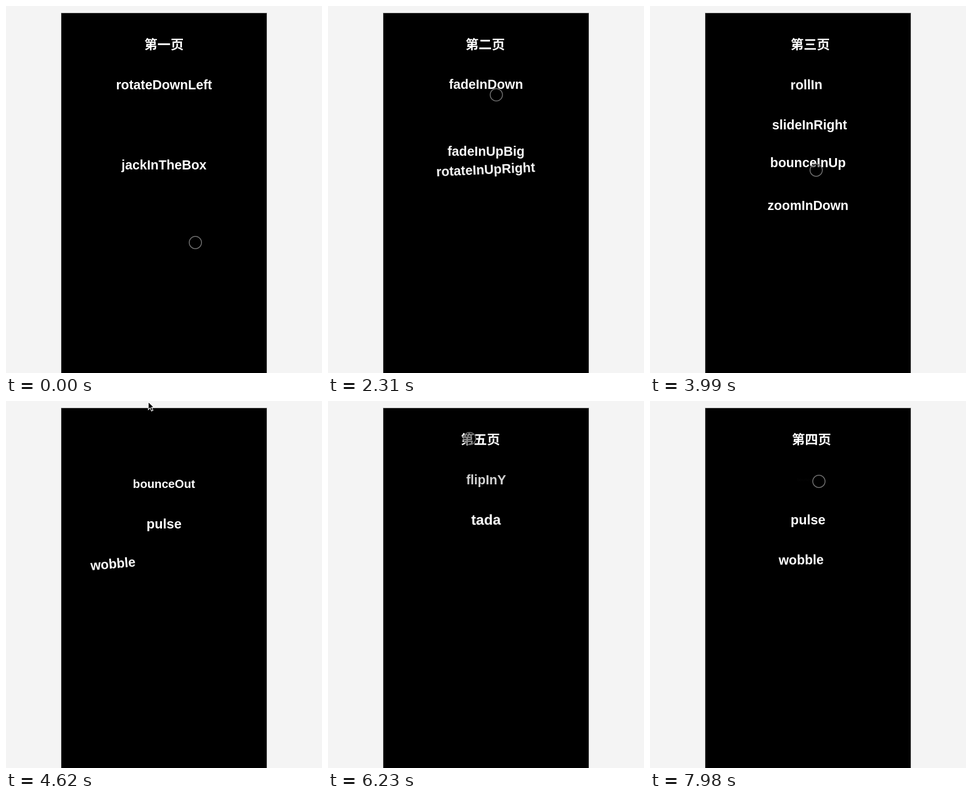
These frames come from a looping animation (695 by 806 pixels, 8000 ms). An HTML page:

```html
<!DOCTYPE html>
<html lang="zh">
<head>
<meta charset="utf-8">
<style>
html, body { margin: 0; width: 100%; height: 100%; overflow: hidden; background: #f4f4f4; }
#phone {
  position: absolute; left: 122px; top: 16px; width: 451px; height: 790px; overflow: hidden;
  background: #000; box-shadow: 0 0 0 1px #777;
}
.page { position: absolute; left: 0; width: 100%; height: 790px; }
.row {
  position: absolute; left: 0; width: 100%; height: 44px; text-align: center; white-space: nowrap; color: #fff;
  font: bold 28.8px/44px "Liberation Sans", "Noto Sans CJK SC", "Noto Sans CJK", sans-serif;
}
#ring {
  position: absolute; left: -14px; top: -14px; width: 29px; height: 29px; box-sizing: border-box;
  border: 2.3px solid #6c6c6c; border-radius: 50%; background: rgba(0, 0, 0, .45);
}
#pointer { position: absolute; left: 0; top: 0; }
#arrow { position: absolute; left: -2px; top: -2px; }
</style>
</head>
<body>
<div id="phone"><div id="track"></div></div>
<div id="pointer">
  <div id="ring"></div>
  <svg id="arrow" width="20" height="26"><path d="M2 2V19L6 15.2 9 22 12.3 20.5 9.3 14H14.5Z" stroke="#fff" stroke-width="1.4"/></svg>
</div>
<script>
const LOOP = 8000, PAGE = 790, ROW = 88, DURATION = 1080;
const DRAG = 320, LIFT = 15, SNAP = 340, BEGIN = 130;
const $ = id => document.getElementById(id);

const roll = (x, deg) => `translateX(${x}%) rotate(${deg}deg)`;
const tilt = (scale, deg) => `scale(${scale}) rotate(${deg}deg)`;
const flip = deg => `perspective(400px) rotateY(${deg}deg)`;
const range = n => [...Array(n).keys()];

// Moves from one transform to rest, optionally fading in.
const enter = (from, rest, opacity = 0) => [
  { transform: from, opacity, easing: 'ease' }, { transform: rest, opacity: 1 }
];
// Arrives from far off, then overshoots by smaller and smaller steps.
const bounceIn = (axis, side) => [-3000, 25, -10, 5, 0].map((shift, i) => ({
  offset: i ? Math.min(1, .45 + .15 * i) : 0,
  transform: `translate${axis}(${shift * side}px)`,
  opacity: i ? 1 : 0,
  easing: 'cubic-bezier(.215,.61,.355,1)'
}));

const effects = {
  fromLeft: bounceIn('X', 1),
  fromRight: bounceIn('X', -1),
  bounceInUp: bounceIn('Y', -1),
  fadeInDown: enter('translateY(-100%)', 'translateY(0)'),
  fadeInUpBig: enter('translateY(2000px)', 'translateY(0)'),
  rotateInUpRight: enter('rotate(-90deg)', 'rotate(0deg)'),
  rollIn: enter(roll(-100, -120), roll(0, 0)),
  slideInRight: enter('translateX(100%)', 'translateX(0)', 1),
  zoomInDown: [
    { transform: 'scale(.1) translateY(-1000px)', opacity: 0, easing: 'cubic-bezier(.55,.055,.675,.19)' },
    { transform: 'scale(.475) translateY(60px)', opacity: 1, offset: .6, easing: 'cubic-bezier(.175,.885,.32,1)' },
    { transform: 'scale(1) translateY(0)', opacity: 1 }
  ],
  bounceOut: [
    { transform: 'scale(1)', opacity: 1, easing: 'ease' },
    { transform: 'scale(.9)', opacity: 1, offset: .2, easing: 'ease' },
    { transform: 'scale(1.1)', opacity: 1, offset: .5 },
    { transform: 'scale(1.1)', opacity: 1, offset: .55, easing: 'ease' },
    { transform: 'scale(.3)', opacity: 0 }
  ],
  pulse: [1, 1.05, 1].map(s => ({ transform: `scale(${s})`, easing: 'ease' })),
  wobble: range(7).map(i => {
    const swing = i % 6 ? (6 - i) * (i % 2 ? -1 : 1) : 0;
    return { offset: i < 6 ? .15 * i : 1, transform: roll(5 * swing, swing), easing: 'ease' };
  }),
  flipInY: [
    { transform: flip(90), opacity: 0, easing: 'ease-in' },
    ...[-20, 10, -5, 0].map((deg, i) => ({
      offset: .4 + .2 * i, transform: flip(deg), easing: 'ease-in', ...(i ? { opacity: 1 } : {})
    }))
  ],
  tada: range(11).map(i => ({
    transform: i % 10 ? i < 3 ? tilt(.9, -3) : tilt(1.1, i % 2 ? 3 : -3) : tilt(1, 0),
    easing: 'ease'
  }))
};

const pages = [
  ['第一页', '', 'rotateDownLeft', '', 'jackInTheBox'],
  ['第二页', 'fromLeft', 'fadeInDown', 'fadeInUpBig', 'rotateInUpRight'],
  ['第三页', 'fromLeft', 'rollIn', 'slideInRight', 'bounceInUp', 'zoomInDown'],
  ['第四页', 'fromRight', 'bounceOut', 'pulse', 'wobble'],
  ['第五页', 'fromRight', 'flipInY', 'tada']
].map(([title, titleEffect, ...names], n) => {
  const page = document.createElement('div');
  page.className = 'page';
  page.style.top = n * PAGE + 'px';
  $('track').append(page);
  const anims = [];
  [title, ...names].forEach((text, i) => {
    const row = document.createElement('div');
    row.className = 'row';
    row.textContent = text;
    row.style.top = 47 + ROW * i + 'px';
    page.append(row);
    const effect = effects[i ? text : titleEffect];
    if (!effect) return;
    if (text === 'rotateInUpRight') row.style.transformOrigin = 'right bottom';
    const duration = text === 'bounceOut' ? DURATION * .75 : DURATION;
    const anim = row.animate(effect, { duration, fill: 'both' });
    anim.pause();
    anims.push(anim);
  });
  return { page, anims };
});

// The pointer reaches `a` at `ready`, then drags to `b` and lets go at `release`.
const swipes = [
  { ready: 350, release: 1335, a: [351, 353], b: [351, 87], to: 1 },
  { ready: 2586, release: 2906, a: [390, 311], b: [351, 75], to: 2 },
  { ready: 3900, release: 4328, a: [365, 360], b: [313, 2], to: 3 },
  { ready: 5190, release: 5525, a: [345, 330], b: [312, 4], to: 4 },
  { ready: 6230, release: 7105, a: [311, 82], b: [483, 330], to: 3 }
];
const first = { release: 140 - LIFT - SNAP, b: [416, 519], to: 0 };
const last = { ready: 7980, release: Infinity, a: [371, 176] };
const visits = [first, ...swipes];

// The page follows the finger, then snaps to the next one.
const stops = visits.slice(1).flatMap(({ release, a, b, to }, i) => {
  const y = -visits[i].to * PAGE, dragged = y + b[1] - a[1];
  return [[release - DRAG, y], [release, dragged], [release + LIFT, dragged, 'ease'], [release + LIFT + SNAP, -to * PAGE]];
});
const slide = $('track').animate([[0, 0], ...stops, [LOOP, stops.at(-1)[1]]].map(([time, y, easing = 'linear']) =>
  ({ offset: time / LOOP, transform: `translateY(${y}px)`, easing })), { duration: LOOP, fill: 'both' });
slide.pause();

const clamp = k => Math.max(0, Math.min(1, k));
const mix = (a, b, k) => a.map((v, i) => v + (b[i] - v) * k);

function pointerAt(t) {
  const plan = [...swipes, last];
  const i = plan.findIndex(s => t < s.release);
  const { ready, release, a, b } = plan[i], from = visits[i];
  if (t > release - DRAG) return mix(a, b, (t - release + DRAG) / DRAG);
  const leave = from.release + LIFT + SNAP;
  return mix(from.b, a, clamp((t - leave) / (ready - leave)) ** 2);
}

function draw() {
  const t = performance.now() % LOOP;
  const { release, to } = visits.filter(v => v.release + BEGIN <= t).pop() || first;
  pages.forEach(({ page, anims }, n) => {
    page.style.visibility = n === to ? 'visible' : 'hidden';
    anims.forEach(a => a.currentTime = n === to ? t - release - BEGIN : 0);
  });
  slide.currentTime = t;
  const [x, y] = pointerAt(t), outside = y < 16;
  $('pointer').style.transform = `translate(${x}px, ${y}px)`;
  $('arrow').style.display = outside ? 'block' : 'none';
  $('ring').style.display = outside ? 'none' : 'block';
  requestAnimationFrame(draw);
}
draw();
</script>
</body>
</html>
```
